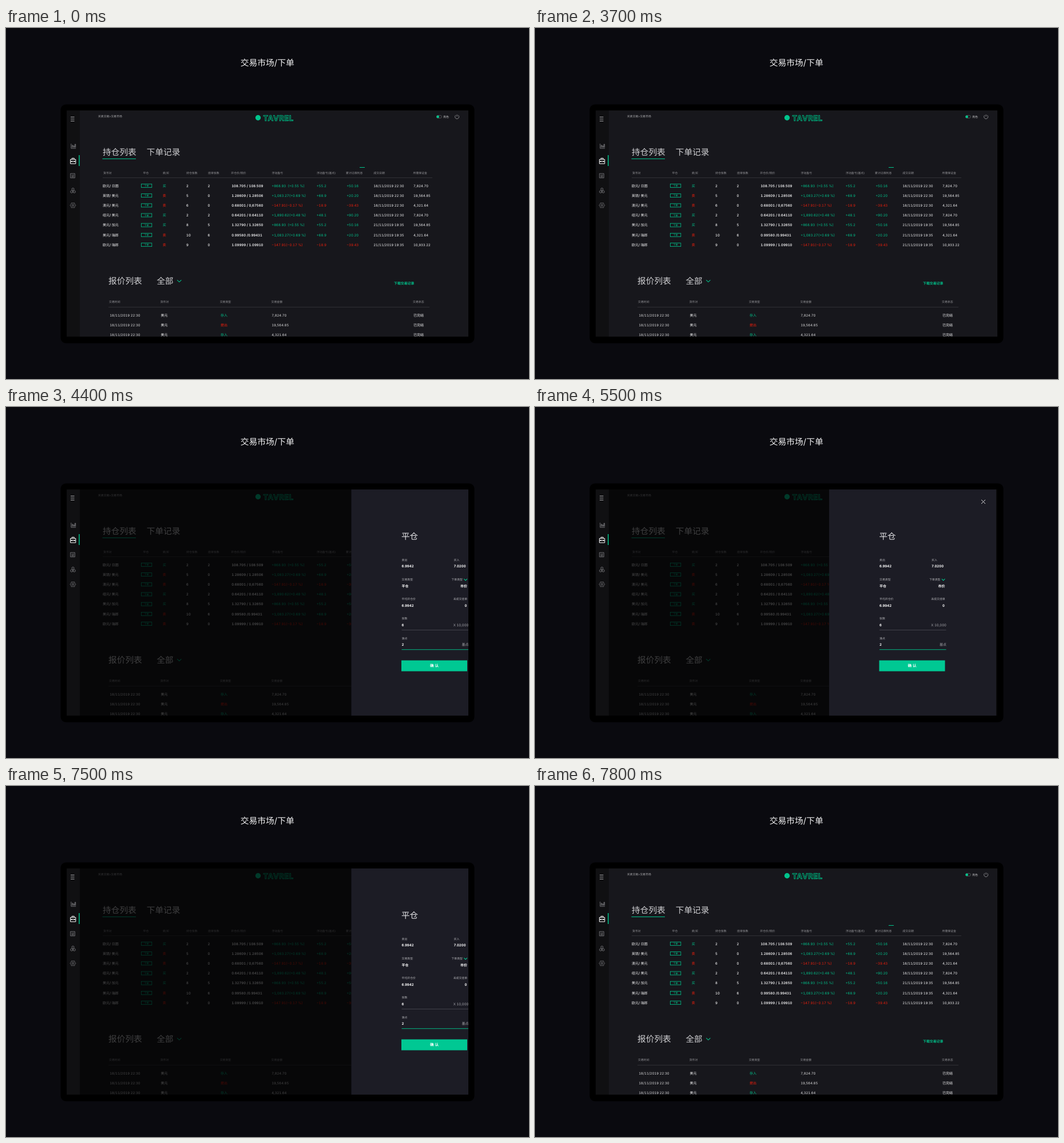
An HTML page that plays this animation: 914x613 px, repeating every 7900 ms.

```html
<!DOCTYPE html>
<html>
<head>
<meta charset="utf-8">
<title>交易市场/下单</title>
<style>
html, body { margin: 0; width: 100%; height: 100%; overflow: hidden; background: #0a0a0f; }
svg { display: block; width: 914px; height: 613px; }
text {
  font-family: Inter, "Noto Sans CJK SC", "Noto Sans CJK", sans-serif;
  font-variant-numeric: tabular-nums;
  text-rendering: geometricPrecision;
  white-space: pre;
}
</style>
</head>
<body>
<svg id="stage" viewBox="0 0 914 613">
  <defs><clipPath id="view"><rect x="129" y="144" width="679" height="395"/></clipPath></defs>
  <rect width="914" height="613" fill="#0a0a0f"/>
  <rect x="95.5" y="133.5" width="723" height="417" rx="9" fill="#000"/>
  <rect x="106" y="144" width="23" height="395" fill="#101012"/>
  <rect x="129" y="144" width="679" height="395" fill="#17171c"/>
  <g id="side"></g>
  <g clip-path="url(#view)">
    <g id="page"></g>
    <rect id="dim" x="129" y="144" width="679" height="395" fill="#000" opacity=".7"/>
    <g id="panel"></g>
  </g>
</svg>
<script>
const NS = 'http://www.w3.org/2000/svg';
const GREEN = '#00c48c', RED = '#f01f0c', WHITE = '#f4f4f5', SOFT = '#d0d0d3', GREY = '#98989c', RULE = '#37373c';
const byId = id => document.getElementById(id);
const stage = byId('stage'), side = byId('side'), page = byId('page'), panel = byId('panel');

function add(parent, tag, attrs) {
  const el = document.createElementNS(NS, tag);
  for (const k in attrs) el.setAttribute(k, attrs[k]);
  return parent.appendChild(el);
}

// y is the vertical middle of the glyphs
function label(parent, x, y, str, size, fill, weight = 400, anchor = 'start') {
  const el = add(parent, 'text', {
    x, y: y + size * 0.37, fill, 'font-size': size, 'font-weight': weight, 'text-anchor': anchor
  });
  el.textContent = str;
  return el;
}

const line = (parent, d, stroke, width = 0.8) =>
  add(parent, 'path', { d, stroke, 'stroke-width': width, fill: 'none' });
const ring = (parent, cx, cy, r, stroke, width = 0.8) =>
  add(parent, 'circle', { cx, cy, r, stroke, 'stroke-width': width, fill: 'none' });

function drawSide() {
  const c = '#86868a';
  line(side, 'M113 155.5h6.5M113 159h6.5M113 162.5h6.5', '#a8a8ab', 1);
  line(side, 'M113.8 202v8.2h8.4M115.6 208.6v-3.8h1.4v3.8M118 208.6v-2.6h1.3v2.6M120.3 208.6v-5.6h1.4v5.6', c);
  line(side, 'M112.6 229.4h9.2v7.6h-9.2zM115.2 229.2v-1.8h4v1.8M112.6 233h9.2', '#fff', 1);
  for (const x of [114.9, 119.5]) add(side, 'circle', { cx: x, cy: 233, r: 1, fill: '#fff' });
  add(side, 'rect', { x: 127.2, y: 222, width: 1.5, height: 19, fill: GREEN });
  line(side, 'M112.7 254.2h7.6v7.6h-7.6zM114.4 256.6h1.2M116.4 256.6h2.4M114.4 258.4h4.4M114.4 260.1h4.4', c);
  for (const [x, y] of [[117, 281.5], [114.7, 286], [119.3, 286]]) ring(side, x, y, 2, c);
  const cog = [];
  for (let i = 0; i < 48; i++) {
    const a = i * Math.PI / 24, r = 4.2 + 0.6 * Math.cos(6 * a);
    cog.push((117 + r * Math.cos(a)).toFixed(2) + ' ' + (309.7 + r * Math.sin(a)).toFixed(2));
  }
  line(side, 'M' + cog.join('L') + 'Z', c);
  ring(side, 117, 309.7, 1.6, c);
}

function drawHeader() {
  label(page, 161, 154.3, '买卖交易>交易市场', 4.85, '#b4b4b7');
  add(page, 'circle', { cx: 440.5, cy: 156.7, r: 4.7, fill: GREEN });
  const word = label(page, 449.5, 156.8, 'TAVREL', 13, '#0c1a18', 700);
  for (const [k, v] of [['stroke', GREEN], ['stroke-width', 0.8], ['letter-spacing', 0.6]]) word.setAttribute(k, v);
  add(page, 'rect', { x: 752.4, y: 152.7, width: 9, height: 4.6, rx: 2.3, fill: 'none', stroke: '#77777b', 'stroke-width': 0.6 });
  add(page, 'circle', { cx: 754.7, cy: 155, r: 2.3, fill: GREEN });
  label(page, 764, 155, '亮色', 5, '#c4c4c6');
  line(page, 'M786.2 152.2a3.5 3.5 0 1 0 3.9 0M788.15 151.2v3.6', '#a0a0a4', 0.8);
}

const heads = (y, cols) => cols.forEach(([x, s]) => label(page, x, y, s, 4.9, GREY));

let hoverBox, hoverText;

function drawPositions() {
  label(page, 169, 216.5, '持仓列表', 14.7, SOFT, 300);
  label(page, 245.7, 216.5, '下单记录', 14.7, SOFT, 300);
  line(page, 'M168.5 228.5H227', GREEN, 1.1);
  line(page, 'M618 243.5h9', GREEN, 1);
  heads(253, [[170, '货币对'], [239.5, '平仓'], [273.7, '卖/买'], [315, '持仓张数'], [353, '挂单张数'],
    [393.3, '开仓价/现价'], [464.5, '浮动盈亏'], [543, '浮动盈亏(基点)'], [594, '累计过夜利息'],
    [642.3, '成交日期'], [711.5, '所需保证金']]);
  line(page, 'M169 261.5H745', RULE, 0.8);

  const gains = ['+868.93  (+0.55 %)|+55.2|+50.16', '+1,083.27(+0.69 %)|+68.9|+20.20',
    '−147.91(−0.17 %)|−18.9|−39.43', '+1,890.62(+0.48 %)|+48.1|+90.20'];
  const rows = [
    ['欧元/ 日圆', 2, 2, '108.705 / 108.509', 0, '7,824.70'],
    ['英镑/ 美元', 5, 0, '1.28609 / 1.28506', 1, '19,564.85'],
    ['澳元/ 美元', 6, 0, '0.68001 / 0,67560', 2, '4,321.64'],
    ['纽元/ 美元', 2, 2, '0.64201 / 0.64110', 3, '7,824.70'],
    ['美元/ 加元', 8, 5, '1.32790 / 1.32650', 0, '19,564.85'],
    ['美元/ 瑞郎', 10, 6, '0.99580 /0.99431', 1, '4,321.64'],
    ['欧元/ 瑞郎', 9, 0, '1.09999 / 1.09910', 2, '10,933.22']
  ];
  rows.forEach(([pair, qty, pending, price, gain, margin], i) => {
    const y = 275.4 + i * 17.2, buy = gain === 0 || gain === 3;
    const [profit, points, interest] = gains[gain].split('|');
    const tone = gain === 2 ? RED : GREEN;
    label(page, 169, y, pair, 6, WHITE, 500);
    const box = add(page, 'rect', { x: 236.4, y: y - 3, width: 18.4, height: 6, fill: 'none', stroke: GREEN, 'stroke-width': 0.8 });
    const text = label(page, 245.6, y, '下单', 4.2, GREEN, 500, 'middle');
    if (i === 3) [hoverBox, hoverText] = [box, text];
    label(page, 273.7, y, buy ? '买' : '卖', 6, buy ? GREEN : RED, 500);
    label(page, 315, y, qty, 6, WHITE, 500);
    label(page, 352.5, y, pending, 6, WHITE, 500);
    label(page, 394.2, y, price, 6, WHITE, 600);
    label(page, 464.3, y, profit, 6, tone);
    label(page, 542.7, y, points, 6, tone);
    label(page, 595.2, y, interest, 6, tone);
    label(page, 642.3, y, i < 4 ? '18/11/2019 22:30' : '21/11/2019 19:35', 5.9, WHITE);
    label(page, 712, y, margin, 5.9, WHITE);
  });
}

function drawQuotes() {
  label(page, 179, 441.3, '报价列表', 14.7, SOFT, 300);
  label(page, 263.5, 441.3, '全部', 14.5, SOFT, 300);
  line(page, 'M299.2 440.2l3.6 3.4 3.6-3.4', GREEN, 1.1);
  label(page, 678, 445.4, '下载交易记录', 5.9, GREEN, 700);
  heads(478, [[180, '交易时间'], [269.7, '货币对'], [373.7, '交易类型'], [463.5, '交易金额'], [711, '交易状态']]);
  line(page, 'M179 487.5H740', RULE, 0.8);
  const sums = ['7,824.70', '19,564.85', '4,321.64'];
  for (let i = 0; i < 6; i++) {
    const y = 501.4 + i * 17.2, out = i % 3 === 1;
    label(page, 181.3, y, '18/11/2019 22:30', 5.9, '#dededf');
    label(page, 270.5, y, '美元', 6, WHITE);
    label(page, 375, y, out ? '提出' : '存入', 6, out ? RED : GREEN);
    label(page, 464.3, y, sums[i % 3], 5.9, '#dededf');
    label(page, 712, y, '已完结', 6, WHITE);
  }
}

function drawPanel() {
  const note = (x, y, s, anchor) => label(panel, x, y, s, 4.9, '#b4b4b8', 400, anchor);
  const value = (x, y, s, anchor) => label(panel, x, y, s, 6, '#fff', 700, anchor);
  const unit = (y, s) => label(panel, 719, y, s, 6, '#a6a6ab', 400, 'end');
  add(panel, 'rect', { x: 514, y: 144, width: 292, height: 395, fill: '#1c1c25' });
  line(panel, 'M780 162l7 7M787 162l-7 7', '#d8d8da', 1);
  label(panel, 601.5, 225.5, '平仓', 14.5, '#e2e2e5', 300);
  note(602, 267, '卖出');
  value(602, 278.2, '6.9942');
  note(693, 267, '买入');
  value(693, 278.2, '7.0200');
  note(602, 301.5, '交易类型');
  value(602, 313, '平仓');
  note(708.5, 301.5, '下单类型', 'end');
  line(panel, 'M710.8 300.2l2.8 2.7 2.8-2.7', GREEN, 1.1);
  value(716.5, 313, '市价', 'end');
  note(602, 335, '平均开仓价');
  value(602, 346.5, '6.9942');
  note(716.7, 335, '未成交挂单', 'end');
  value(716, 346.5, '0', 'end');
  note(602, 369.6, '张数');
  value(602, 381, '6');
  unit(381, 'X 10,000');
  line(panel, 'M602 389.5H718.5', '#4b4b53', 0.8);
  note(602, 404, '滑点');
  value(602, 415.2, '2');
  unit(415.2, '基点');
  line(panel, 'M602 423.7H718.5', GREEN, 0.9);
  add(panel, 'rect', { x: 601.5, y: 442.5, width: 115, height: 19, fill: '#00c893' });
  label(panel, 659, 452, '确 认', 6.6, '#fff', 700, 'middle');
}

label(stage, 456.7, 61, '交易市场/下单', 14.8, '#f2f2f3', 400, 'middle');
drawSide();
drawHeader();
drawPositions();
drawQuotes();
drawPanel();

const LOOP = 7900, AWAY = 300;
// start time, page scroll, button hover, dimmed, panel shift
const steps = [
  [0, 0, 0, 0, AWAY],
  [2100, 86, 0, 0, AWAY],
  [2600, 43, 0, 0, AWAY],
  [2700, 0, 0, 0, AWAY],
  [3200, 0, 1, 0, AWAY],
  [3700, 0, 0, 0, AWAY],
  [4200, 0, 0, 1, AWAY],
  [4300, 0, 0, 1, 196],
  [4400, 0, 0, 1, 89.5],
  [4500, 0, 0, 1, 2],
  [5500, 0, 0, 1, 0],
  [6500, 0, 0, 1, 2],
  [7500, 0, 0, 1, 89.5],
  [7600, 0, 0, 1, 196],
  [7700, 0, 0, 1, AWAY],
  [7800, 0, 0, 0, AWAY]
];

function render(t) {
  const [, scroll, hover, dim, shift] = steps.filter(s => s[0] <= t).pop();
  page.setAttribute('transform', `translate(0 ${-scroll})`);
  hoverBox.setAttribute('fill', hover ? GREEN : 'none');
  hoverText.setAttribute('fill', hover ? '#fff' : GREEN);
  byId('dim').setAttribute('visibility', dim ? 'visible' : 'hidden');
  panel.setAttribute('transform', `translate(${shift} 0)`);
}

let start;
function tick(now) {
  if (start === undefined) start = now;
  render((now - start) % LOOP);
  requestAnimationFrame(tick);
}
render(0);
requestAnimationFrame(tick);
</script>
</body>
</html>
```
